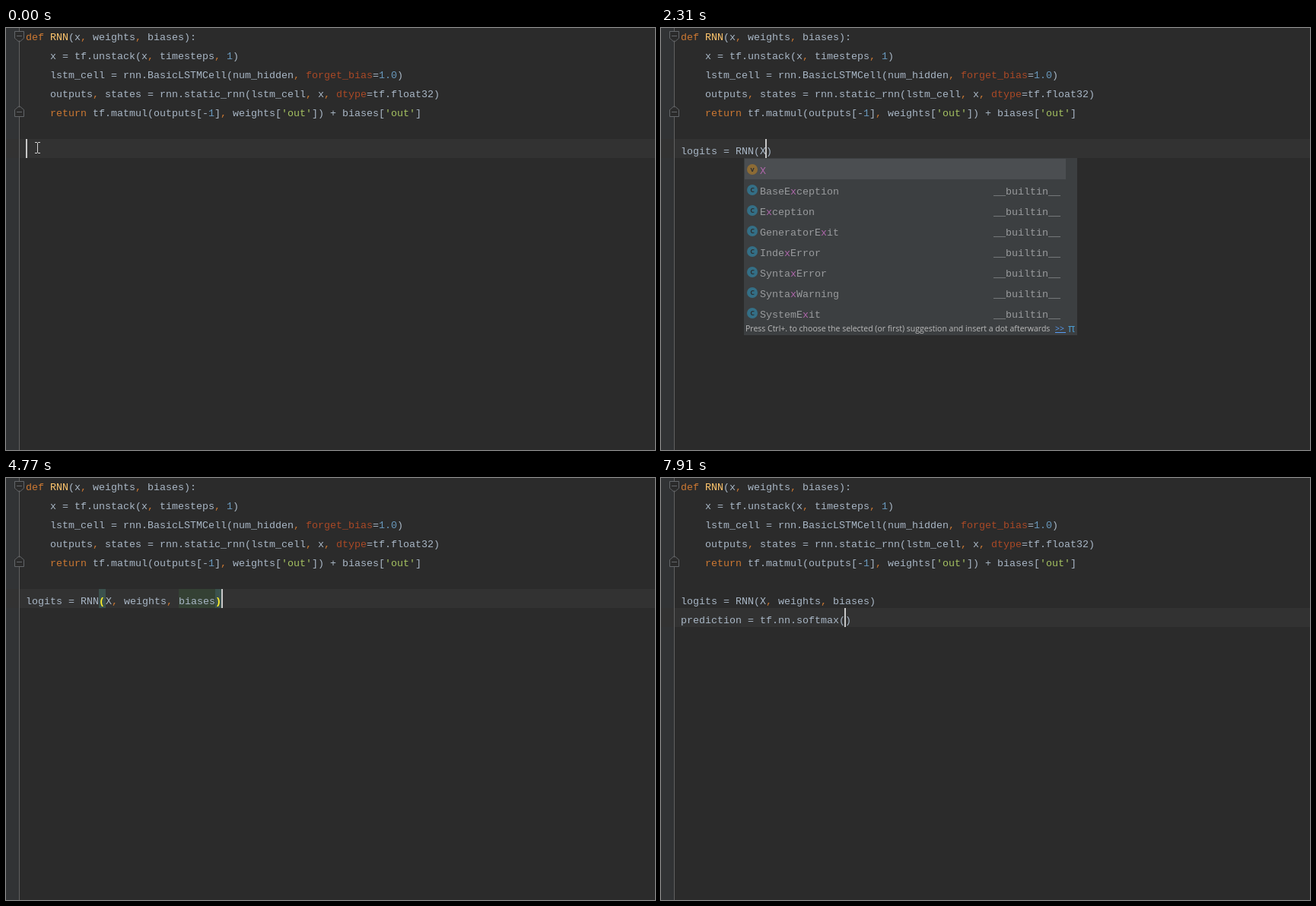
An HTML page with a canvas that plays this animation: 853x555 px, repeating every 8000 ms.

```html
<!DOCTYPE html>
<html lang="en">
<head>
<meta charset="utf-8">
<title>Code completion</title>
<style>
  html, body { margin: 0; width: 100%; height: 100%; overflow: hidden; background: #2b2b2b; }
  canvas { display: block; }
</style>
</head>
<body>
<canvas id="stage" width="853" height="555"></canvas>
<script>
const ctx = document.getElementById('stage').getContext('2d');
const LOOP = 8000, LEFT = 26, CELL = 8, LINE = 25, ITEM = 27;
const MONO = '13.333px "Liberation Mono", monospace';
const UI = '10.5px "Open Sans", sans-serif';
const FG = '#a9b7c6', KEYWORD = '#cc7832';

const CODE = [
  'def RNN(x, weights, biases):',
  '    x = tf.unstack(x, timesteps, 1)',
  '    lstm_cell = rnn.BasicLSTMCell(num_hidden, forget_bias=1.0)',
  '    outputs, states = rnn.static_rnn(lstm_cell, x, dtype=tf.float32)',
  "    return tf.matmul(outputs[-1], weights['out']) + biases['out']",
  ''
];

// Suggestions: icon letter, a space, then the label.
const xItems = ['v X', 'C BaseException', 'C Exception', 'C GeneratorExit', 'C IndexError',
  'C SyntaxError', 'C SyntaxWarning', 'C SystemExit'];
const wItems = ['p weights=', 'v weights', 'C memoryview', 'f pow(x, y)', 'f raw_input(prompt)'];
const wMore = [...wItems, 'C DeprecationWarning', 'C FutureWarning'];
const lItems = ['C list', 'C long', 'f len(p_object)', 'f locals()', 'f license()', 'C LookupError',
  'f all(iterable)', 'f callable(p_object)', 'C classmethod', 'f compile(source, filename)',
  'C complex', 'f delattr(p_object, p_name)'];
const lMore = ['v learning_rate', ...lItems];
const lAll = ['v learning_rate', 'v lstm_cell', ...lItems];
const pItems = ['f pow(x, y)', 'C property', 'f print(args)', 'C PendingDeprecationWarning',
  'f input(prompt)', 'f map(function, sequence)', 'f repr(p_object)', 'f open(name, mode)',
  'f compile(source, filename)', 'C complex', 'f cmp(x, y)', 'C ImportError'];
const pMore = ['v prediction', ...pItems];

const CALL = 'logits = RNN(X, weights, biases)';
const popup = (items, key, start, width = 438) => ({ items, key, start, width });
const WIDE = 501;

// Each step changes only the named parts of the editor state.
const STEPS = [
  [0, { row: 6, lines: [''], col: 0, caret: true, mouse: true, popup: null, braces: false, usage: false }],
  [70, { caret: false }],
  [380, { lines: ['l'], col: 1, caret: true, mouse: false }],
  [480, { popup: popup(lItems, 'l', 0, WIDE) }],
  [790, { popup: popup(lMore, 'l', 0, WIDE) }],
  [860, { popup: popup(lAll, 'l', 0, WIDE) }],
  [1140, { caret: false }],
  [1370, { lines: ['logits = RNN()'], col: 13, caret: true, popup: null }],
  [2310, { lines: ['logits = RNN(X)'], col: 14, popup: popup(xItems, 'x', 13) }],
  [2710, { lines: ['logits = RNN(X, )'], col: 16, popup: null }],
  [3010, { braces: true }],
  [3420, { lines: ['logits = RNN(X, w)'], col: 17, braces: false }],
  [3500, { popup: popup(wItems, 'w', 16) }],
  [3730, { popup: popup(wMore, 'w', 16) }],
  [4160, { lines: ['logits = RNN(X, weights)'], col: 23, popup: null }],
  [4240, { lines: [CALL], col: 31 }],
  [4770, { col: 32, braces: true, usage: true }],
  [5090, { row: 7, lines: [CALL, ''], col: 0, braces: false, usage: false }],
  [5640, { caret: false }],
  [6180, { caret: true }],
  [6640, { caret: false }],
  [6790, { lines: [CALL, 'p'], col: 1, caret: true }],
  [6880, { popup: popup(pItems, 'p', 0, WIDE) }],
  [7330, { popup: popup(pMore, 'p', 0, WIDE) }],
  [7680, { caret: false }],
  [7910, { lines: [CALL, 'prediction = tf.nn.softmax()'], col: 27, caret: true, popup: null }]
];

const stateAt = t => Object.assign({}, ...STEPS.filter(s => s[0] <= t).map(s => s[1]));
const rowTop = row => row * LINE - 4;

function rect(x, y, w, h, color) {
  ctx.fillStyle = color;
  ctx.fillRect(x, y, w, h);
}

function text(str, x, y, color, font = MONO, align = 'left') {
  ctx.font = font;
  ctx.textAlign = align;
  ctx.fillStyle = color;
  ctx.fillText(str, x, y);
}

function stroke(points, color, close) {
  ctx.beginPath();
  points.forEach(p => ctx.lineTo(...p));
  if (close) ctx.closePath();
  ctx.strokeStyle = color;
  ctx.lineWidth = 1;
  ctx.stroke();
}

const TOKEN = /'[^']*'|\b(?:def|return)\b|(?<=def )\w+|\d[\d.]*|\w+|./g;

function tokenColor(token, line, end) {
  if (/^(def|return|,)$/.test(token)) return KEYWORD;
  if (token[0] === "'") return '#a5c261';
  if (/^\d/.test(token)) return '#6897bb';
  if (line.startsWith('def ' + token) && end < 8) return '#ffc66d';
  if (line[end] === '=') return '#aa4926';
  return FG;
}

function drawLine(line, row, braces, usage) {
  const top = rowTop(row);
  let x = LEFT;
  for (const { 0: token, index } of line.matchAll(TOKEN)) {
    const brace = braces && /[()]/.test(token);
    const width = token.length * CELL + (brace ? 1 : 0);
    if (brace) rect(x, top, width, LINE, '#3b514d');
    if (usage && token === 'biases') rect(x, top, width, LINE, '#344134');
    const color = brace ? '#ffef28' : tokenColor(token, line, index + token.length);
    if (token !== ' ') text(token, x, top + 20, color, brace ? 'bold ' + MONO : MONO);
    x += width;
  }
}

function drawCaret({ row, lines, col, braces }) {
  const before = lines[lines.length - 1].slice(0, col);
  const extra = braces ? before.replace(/[^()]/g, '').length : 0;
  const x = Math.max(LEFT, LEFT + col * CELL + extra - 1);
  rect(x, rowTop(row), 2, LINE, '#c8c8c8');
}

// Fold handle whose tip points down (dir 1) or up (dir -1).
function drawFold(y, dir) {
  const shape = [[11.5, y - 6 * dir], [23.5, y - 6 * dir], [23.5, y + 3 * dir],
    [17.5, y + 8 * dir], [11.5, y + 3 * dir]];
  rect(12, y - 6, 11, 12, '#2b2b2b');
  stroke(shape, '#63666a', true);
  stroke([[14, y], [21, y]], '#63666a');
}

function drawMouse() {
  const color = '#d5d5d5';
  stroke([[41.5, 151], [41.5, 164]], color);
  for (const y of [150.5, 164.5]) {
    stroke([[38, y], [41, y]], color);
    stroke([[42, y], [45, y]], color);
  }
}

const ICONS = { v: '#8c6b35', p: '#8c6b35', C: '#346f86', f: '#80505d' };

function drawItem(item, key, left, top, width) {
  const icon = item[0], label = item.slice(2), x = left + 21, y = top + 20;
  ctx.beginPath();
  ctx.arc(left + 11, top + 14, 7, 0, Math.PI * 2);
  ctx.fillStyle = ICONS[icon];
  ctx.fill();
  text(icon, left + 11, top + 17, '#2d3032', 'bold 9px "Open Sans", sans-serif', 'center');

  const hit = label.toLowerCase().indexOf(key);
  [...label].forEach((ch, i) => text(ch, x + i * CELL, y, i === hit ? '#ad66aa' : '#999b9d'));
  if (icon === 'C' || icon === 'f') text('__builtin__', left + width - 22, y, '#999b9d', MONO, 'right');
}

function drawPopup({ items, key, start, width }, row) {
  const left = Math.max(6, LEFT + start * CELL - 21);
  const top = rowTop(row) + LINE;
  const scrolls = items.length > 11;
  const listHeight = scrolls ? 310 : items.length * ITEM;
  const bottom = top + listHeight + 17;

  rect(left, top, width, bottom - top, '#3c3f41');
  ctx.save();
  ctx.beginPath();
  ctx.rect(left, top, width, listHeight);
  ctx.clip();
  rect(left + 1, top + 1, width - 16, ITEM, '#4b4e51');
  items.slice(0, 12).forEach((item, i) => drawItem(item, key, left, top + 1 + i * ITEM, width));
  if (scrolls) rect(left + width - 13, top + 7, 11, 12 * listHeight / items.length * 0.6, '#505355');
  ctx.restore();

  const base = bottom - 5;
  text('Press Ctrl+. to choose the selected (or first) suggestion and insert a dot afterwards',
    left + 2, base, '#bbbbbb', UI);
  text('>>', left + 409, base, '#589df6', UI);
  rect(left + 409, base + 1, 14, 1, '#589df6');
  text('π', left + 426, base + 1, '#4a9bd0', '14px "Open Sans", sans-serif');
}

function draw(t) {
  const state = stateAt(t);
  rect(0, 0, 853, 555, '#2b2b2b');
  rect(0, 0, 17, 555, '#313335');
  rect(0, rowTop(state.row), 853, LINE, '#323232');
  rect(17, 0, 1, 555, '#606060');
  drawFold(10.5, 1);
  drawFold(110.5, -1);

  CODE.forEach((line, row) => drawLine(line, row));
  state.lines.forEach((line, i) => drawLine(line, 6 + i, state.braces, state.usage));
  if (state.caret) drawCaret(state);
  if (state.mouse) drawMouse();
  if (state.popup) drawPopup(state.popup, state.row);
}

const begin = performance.now();
function tick() {
  draw((performance.now() - begin) % LOOP);
  requestAnimationFrame(tick);
}
tick();
</script>
</body>
</html>
```
